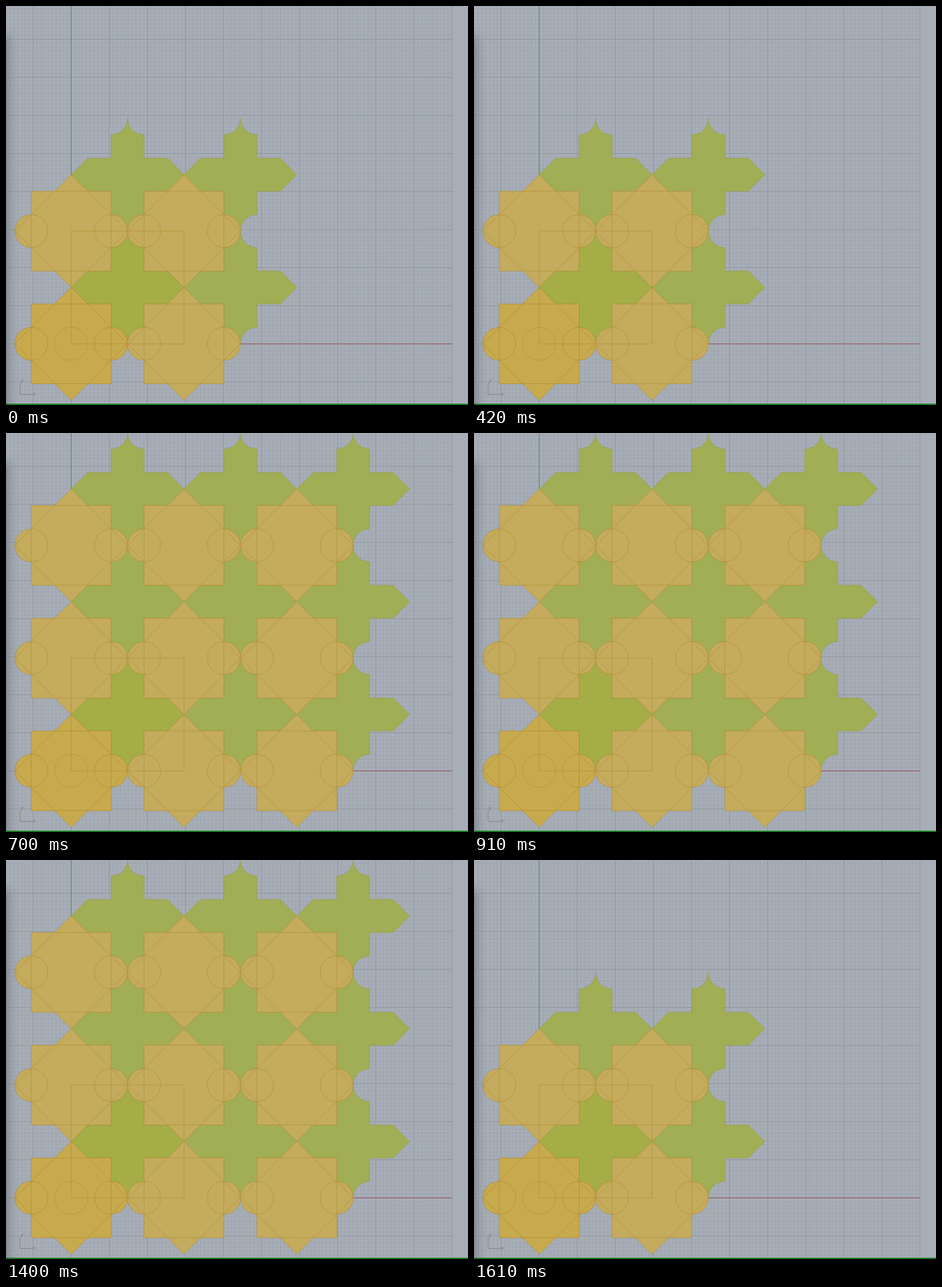
Recreate the animation shown at these times as an HTML page. Size 640x553 px, loop 1750 ms.

```html
<!DOCTYPE html>
<html lang="en">
<head>
<meta charset="utf-8">
<title>Star and cross tiling</title>
<style>
html, body { margin: 0; width: 100%; height: 100%; overflow: hidden; background: #a7aeb7; }
svg { display: block; width: 640px; height: 553px; }
.minor { stroke: #7f8894; stroke-opacity: .2; stroke-width: .8; }
.major { stroke: #858c94; stroke-opacity: .62; stroke-width: 1; }
.cross { fill: #a1ae52; fill-opacity: .96; stroke: #9a9b46; stroke-width: .6; }
.star { fill: #c6ac5a; fill-opacity: .97; }
.lines { fill: none; stroke: #b48f35; stroke-opacity: .8; stroke-width: .8; }
.base .cross { fill: #a5ad42; }
.base .star { fill: #caab4b; }
.base .lines { stroke-opacity: .95; }
text { font: italic 7px Arial, "Liberation Sans", sans-serif; fill: #747b85; }
</style>
</head>
<body>
<svg viewBox="0 0 640 553">
  <defs>
    <linearGradient id="shade">
      <stop offset="0" stop-color="#6f757d" stop-opacity=".6"/>
      <stop offset=".45" stop-color="#7c838b" stop-opacity=".25"/>
      <stop offset="1" stop-color="#8a9199" stop-opacity="0"/>
    </linearGradient>
    <linearGradient id="fade" x2="0" y2="1">
      <stop offset="0" stop-color="#000"/>
      <stop offset=".04" stop-color="#fff"/>
    </linearGradient>
    <mask id="soft"><rect y="30" width="20" height="523" fill="url(#fade)"/></mask>
  </defs>
  <rect width="640" height="553" fill="#a7aeb7"/>
  <g id="grid"></g>
  <path d="M90.3 0V468" stroke="#4c9c56"/>
  <path d="M90.3 468.3H618" stroke="#9c555c"/>
  <g id="tiles"></g>
  <rect y="30" width="18" height="523" fill="url(#shade)" mask="url(#soft)"/>
  <path d="M19.5 523V538.5H37" fill="none" stroke="#838a93"/>
  <text x="20.5" y="522">y</text>
  <text x="37.5" y="540">x</text>
  <rect y="551.3" width="640" height="1.7" fill="#0b7a18"/>
</svg>
<script>
const LOOP = 1750, GROW = 490, SHRINK = 1610;
const X0 = 90.3, Y0 = 468.2, STEP = 156.25;
const H = STEP / 2;         // star tip
const S = H / Math.SQRT2;   // half side of the square
const R = H - S;            // circle radius

function add(parent, tag, attrs) {
  const el = document.createElementNS('http://www.w3.org/2000/svg', tag);
  for (const key in attrs) el.setAttribute(key, attrs[key]);
  return parent.appendChild(el);
}

const circle = (x, r) => `M${x - r} 0a${r} ${r} 0 1 1 ${2 * r} 0a${r} ${r} 0 1 1 ${-2 * r} 0Z`;
const square = `M${-S} ${-S}V${S}H${S}V${-S}Z`;
const diamond = `M0 ${-H}L${-H} 0L0 ${H}L${H} 0Z`;
const starPath = square + diamond + circle(-S, R).replace(/0 1 1/g, '0 1 0') + circle(S, R).replace(/0 1 1/g, '0 1 0');
const crossPath =
  `M${-H} 0L${-S} ${-R}H${-R}V${-S}A${R} ${R} 0 0 0 0 ${-H}` +
  `A${R} ${R} 0 0 0 ${R} ${-S}V${-R}H${S}L${H} 0` +
  `L${S} ${R}H${R}V${S}A${R} ${R} 0 0 0 0 ${H}` +
  `A${R} ${R} 0 0 0 ${-R} ${S}V${R}H${-S}Z`;

function drawGrid() {
  const grid = document.getElementById('grid'), gap = 5.275;
  const paths = { minor: '', major: '' };
  const kind = i => i % 10 ? 'minor' : 'major';
  for (let i = -17; i <= 100; i++) paths[kind(i)] += `M${X0 + i * gap} 0V553`;
  for (let i = -16; i <= 88; i++) paths[kind(i)] += `M0 ${Y0 - i * gap}H618`;
  for (const name in paths) add(grid, 'path', { class: name, d: paths[name] });
}

function drawTile(col, row) {
  const base = !col && !row;
  const tile = add(document.getElementById('tiles'), 'g', {
    class: base ? 'base' : 'tile',
    transform: `translate(${X0 + col * STEP} ${Y0 - row * STEP})`
  });
  add(tile, 'path', { class: 'cross', d: crossPath, transform: `translate(${H} ${-H})` });
  add(tile, 'path', { class: 'star', d: starPath });
  add(tile, 'path', { class: 'lines', d: starPath });
  return tile;
}

drawGrid();
const outer = [];
for (let row = 0; row < 3; row++) {
  for (let col = 0; col < 3; col++) {
    const tile = drawTile(col, row);
    if (Math.max(row, col) === 2) outer.push(tile);
  }
}
// Unit cell and its centre circle
add(document.getElementById('tiles'), 'path', {
  class: 'lines',
  d: `M0 0H${STEP}V${-STEP}H0Z` + circle(0, R),
  transform: `translate(${X0} ${Y0})`
});

const start = performance.now();
function draw() {
  const t = Math.max(0, performance.now() - start) % LOOP;
  const big = t >= GROW && t < SHRINK;
  for (const tile of outer) tile.style.display = big ? '' : 'none';
  requestAnimationFrame(draw);
}
draw();
</script>
</body>
</html>
```
